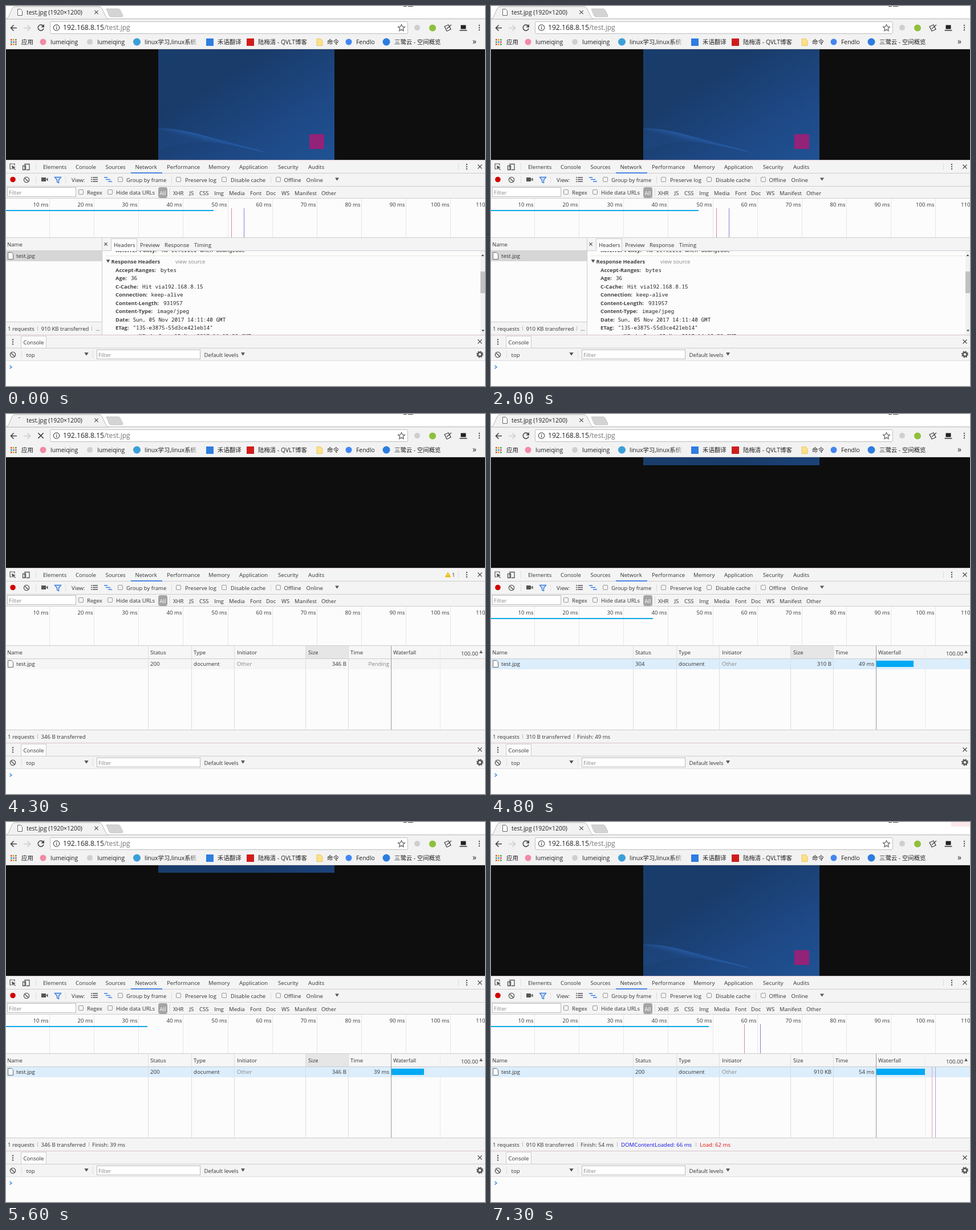
Animation of 840x667 px, one loop 7.5 s. Source, as an HTML page:

```html
<!DOCTYPE html>
<html lang="zh">
<head>
<meta charset="utf-8">
<title>Reload test</title>
<style>
html, body { margin: 0; width: 100%; height: 100%; overflow: hidden; background: #fff; }
svg { display: block; width: 840px; height: 667px; }
text { font: 9.6px 'Open Sans', 'Noto Sans', sans-serif; fill: #333; white-space: pre; }
.ui { font: 10.4px 'Open Sans', 'Noto Sans CJK SC', 'Noto Sans CJK', sans-serif; fill: #222; }
.url { font-size: 12.1px; fill: #222; }
.b { font-weight: 700; font-size: 9.4px; fill: #444; }
.m { font: 9.37px 'Noto Sans Mono', 'DejaVu Sans Mono', monospace; fill: #222; }
.g { fill: #888; }
.e { text-anchor: end; }
</style>
</head>
<body>
<svg id="stage" viewBox="0 0 840 667" xmlns="http://www.w3.org/2000/svg"></svg>
<script>
const T = (x, y, s, c = '', extra = '') => `<text x="${x}" y="${y}" class="${c}" ${extra}>${s}</text>`;
const R = (x, y, w, h, fill, extra = '') => `<rect x="${x}" y="${y}" width="${w}" height="${h}" fill="${fill}" ${extra}/>`;
const P = (d, stroke = '#555', w = 1, fill = 'none') => `<path d="${d}" stroke="${stroke}" stroke-width="${w}" fill="${fill}"/>`;
const C = (x, y, r, fill, extra = '') => `<circle cx="${x}" cy="${y}" r="${r}" fill="${fill}" ${extra}/>`;
const G = (id, body, extra = '') => `<g id="${id}" ${extra}>${body}</g>`;
const H = (y, c = '#ccc', x = 0, w = 840) => R(x, y, w, 1, c);
const V = (x, y, h, c = '#ddd') => R(x, y, 1, h, c);
const row = (y, list, c) => list.map(([x, s]) => T(x, y, s, c)).join('');
const box = (x, y, w, h) => R(x + .5, y + .5, w, h, '#fff', 'stroke="#bbb"');
const check = (x, y) => R(x + .5, y + .5, 8, 8, '#f4f4f4', 'rx="1.5" stroke="#999"');
const cross = (x, y, s, w = 1.3, c = '#555') => P(`M${x - s} ${y - s}l${2 * s} ${2 * s}m0 ${-2 * s}l${-2 * s} ${2 * s}`, c, w);
const tri = (x, y, w, h, c = '#555') => P(`M${x - w} ${y - h / 2}h${2 * w}l${-w} ${h}z`, 'none', 0, c);
const dots = (x, y, c = '#555') => [-4, 0, 4].map(d => C(x, y + d, 1.2, c)).join('');
const ban = (x, y) => C(x, y, 4.6, 'none', 'stroke="#555" stroke-width="1.4"') + P(`M${x - 3} ${y - 3}l6 6`, '#555', 1.4);
const page = (x, y, w, h) => P(`M${x} ${y}h${w - 3}l3 3v${h - 3}h${-w}z`, '#666', 1, '#fff');

const defs = `<defs>
<linearGradient id="sky" x1="0" y1="0" x2="1" y2="1">
  <stop offset="0" stop-color="#193d6c"/><stop offset=".3" stop-color="#193b69"/>
  <stop offset=".65" stop-color="#1d4782"/><stop offset="1" stop-color="#205294"/></linearGradient>
<linearGradient id="beam" gradientUnits="userSpaceOnUse" x1="108" y1="159" x2="105.6" y2="168.7">
  <stop offset="0" stop-color="#2a62b2" stop-opacity=".7"/>
  <stop offset=".45" stop-color="#2860ad" stop-opacity=".38"/>
  <stop offset="1" stop-color="#2860ad" stop-opacity=".13"/></linearGradient>
<linearGradient id="fade"><stop offset="0" stop-color="#f2f2f2" stop-opacity="0"/><stop offset="1" stop-color="#f2f2f2"/></linearGradient>
<clipPath id="fitClip"><rect id="strip" x="267" y="76" width="309" height="194"/></clipPath>
<clipPath id="zoomClip"><rect x="0" y="76" width="830" height="179"/></clipPath>
<clipPath id="paneClip"><rect x="169" y="430" width="663" height="147"/></clipPath>
<clipPath id="markClip"><rect x="240" y="52" width="98" height="22"/></clipPath>
<g id="pic">${R(0, 0, 310, 194, 'url(#sky)')}
${P('M0 138C45 139.5 78 151 108 159C125 163.5 140 167.5 157 171.6S180 178 195 183C150 174 110 162 76 162C50 162 25 169 0 177z', 'none', 0, 'url(#beam)')}
${R(265, 149, 26, 26, '#932279')}</g>
</defs>`;

const grid = () => [0, 1, 2].flatMap(i => [0, 1, 2].map(j =>
  R(8 + i * 4, 58 + j * 4, 2.6, 2.6, ['#e8453c', '#f0a020', '#3aa757', '#4285f4'][(i + j * 2) % 4]))).join('');

const chrome = [
  R(0, 0, 840, 76, '#f2f2f2'), R(0, 0, 840, 22, '#fff'),
  P('M-1 23C7 22 8 3 15 1H164C171 3 173 22 180 23z', '#b5b5b5', 1, '#f2f2f2'),
  H(22, '#b5b5b5', 180, 660),
  P('M176 5H197Q199 5 200 7L205 17Q205 19 203 19H185Q182 19 181 17z', '#c2c2c2', 1, '#d4d4d4'),
  R(697, 0, 6, 1, '#444'), R(705, 0, 9, 1, '#444'),
  T(36, 15, 'test.jpg (1920×1200)', 'ui'), cross(158.5, 11, 3.2, 1.2),
  P('M19 38.5H9M13.5 33.5l-5 5 5 5', '#444', 1.6), P('M31 38.5H42M37.5 33.5l5 5-5 5', '#ccc', 1.5),
  R(77.5, 27.5, 627, 21, '#fff', 'rx="2" stroke="#bfbfbf"'),
  C(88.5, 38, 5.2, 'none', 'stroke="#555" stroke-width="1.2"'), R(88, 37, 1.2, 4, '#555'), R(88, 35, 1.2, 1.2, '#555'),
  T(100, 42, '192.168.8.15<tspan fill="#777">/test.jpg</tspan>', 'ui url'),
  P('M693.5 32.5l1.7 3.8 4.2.4-3.1 2.8.9 4.1-3.7-2.1-3.7 2.1.9-4.1-3.1-2.8 4.2-.4z', '#555', 1.1),
  C(721, 38, 5, '#cfcfcf'), C(748, 38.5, 6, '#8fbf3c'),
  P('M769 36l7-3 4 8-7 3zM773 40l8-7', '#444', 1.3),
  R(797.5, 33.5, 9, 7, '#222'), R(795.5, 42, 13, 1.6, '#444'), dots(830, 38),
  grid(),
  C(65, 63, 5.5, '#f28aa5'), C(147, 63, 5, '#cfcfcf'), C(229.5, 63, 6.5, '#3a9fd8'),
  R(351, 57, 13, 13, '#2f7de1'), R(422, 57, 13, 13, '#cf1c1c'),
  P('M545 57.5h7l3 3v9h-10z', '#e8c862', 1, '#fbe08a'),
  C(601, 63, 5.5, '#4285f4'), C(667, 63, 6.5, '#2b7de0'),
  row(67, [[27, '应用'], [78, 'lumeiqing'], [160, 'lumeiqing'], [371, '禾语翻译'],
    [442, '陆梅清 - QVLT博客'], [563, '命令'], [614, 'Fendlo'], [681, '三鹭云 - 空间概览']], 'ui'),
  `<g clip-path="url(#markClip)">${T(243, 67, 'linux学习,linux系统', 'ui')}${R(322, 53, 16, 20, 'url(#fade)')}</g>`,
  T(818, 67, '»', 'ui', 'style="font-size:14px"'), H(75, '#d0d0d0'),
  G('file', page(20.5, 5.5, 8, 11)), G('spin', R(22, 6, 3, 1, '#777')),
  G('reload', P('M65.5 35.5A5 5 0 1 0 66 39.5', '#444', 1.6) + P('M67 32v5.5h-5.5z', 'none', 0, '#444')),
  G('stop', cross(61, 38, 4.6, 1.5, '#444')),
].join('');

const view = [
  R(0, 76, 840, 194, '#0e0e0e'),
  G('fit', '<use href="#pic" x="267" y="76"/>', 'clip-path="url(#fitClip)"'),
  G('zoom', [
    R(0, 76, 840, 194, '#f1f1f1'),
    '<g clip-path="url(#zoomClip)"><use id="big" href="#pic"/></g>',
    R(13, 257, 409, 11, '#a8a8a8'), '<rect id="thumb" x="832" y="214" width="8" height="27" fill="#c1c1c1"/>',
    P('M7 260v5l-3-2.5zM822 260v5l3-2.5zM833.5 85h5l-2.5-3z', 'none', 0, '#555'), tri(836, 248, 2.5, 3, '#999'),
  ].join('')),
].join('');

const ticks = Array.from({ length: 11 }, (_, i) => {
  const x = Math.round(76 + 78.15 * i);
  return V(x, 338, 68, '#e6e6e6') + T(x - 1.5, 352, `${10 * (i + 1)} ms`, 'e');
}).join('');

const tools = [
  R(0, 270, 840, 397, '#fcfcfc'), R(0, 270, 840, 67, '#f4f4f4'), H(270, '#d8c4cc'),
  P('M11 277H7v9h3M11 277h4v3', '#555', 1.2), P('M10 280l7 3-3 1 3 3-1 1-3-3-2 2z', 'none', 0, '#555'),
  P('M33 286.5v-9h8v10h-5M29.5 280.5h5v7h-5z', '#555', 1.3), V(52, 276, 12),
  row(286, [[65, 'Elements'], [122, 'Console'], [174.5, 'Sources'], [226.5, 'Network'], [282, 'Performance'],
    [355, 'Memory'], [409, 'Application'], [477, 'Security'], [530, 'Audits']]),
  V(793, 276, 12), dots(808, 282), cross(831, 282, 3.5, 1.4),
  H(293), R(219, 292, 55, 2, '#4a86e0'), C(12, 304.5, 4.8, '#d50000'), ban(36, 305), V(52, 299, 12), V(104, 299, 12),
  R(62, 301, 8, 7, '#555'), P('M70 304.5l3.5-3v6z', 'none', 0, '#555'),
  P('M85.5 300.5h11l-4 5v5l-3-1.5v-3.5z', '#3b7de0', 1.3, '#cfe0fb'),
  P('M149 301h2m1 0h9M149 304.5h2m1 0h9M149 308h2m1 0h9', '#555', 1.7),
  P('M172 301h6M175 304.5h8M179 308h7', '#3b7de0', 1.7),
  [[196, 300], [298, 300], [378, 300], [473, 300], [127, 322], [178, 322]].map(a => check(...a)).join(''),
  V(290, 299, 12), V(464, 299, 12),
  row(309, [[115, 'View:'], [211, 'Group by frame'], [314, 'Preserve log'], [394, 'Disable cache'], [487.5, 'Offline'], [526.5, 'Online']]),
  tri(580.5, 304, 3.5, 5), H(316),
  box(2, 318, 120, 16), T(5, 331, 'Filter', 'g'),
  R(267, 318, 16, 19, '#a5a5a5', 'rx="4"'), T(269.5, 332, 'All', '', 'style="fill:#fff"'),
  row(331, [[142, 'Regex'], [193, 'Hide data URLs']]),
  row(332, [[293, 'XHR'], [321.5, 'JS'], [339, 'CSS'], [365, 'Img'], [391, 'Media'],
    [428, 'Font'], [456, 'Doc'], [483, 'WS'], [506, 'Manifest'], [553, 'Other']]),
  V(287, 320, 14), H(337), ticks,
  '<rect id="bar" x="0" y="358" height="2" fill="#0fa5ea"/>',
  '<rect id="red" y="355" width="1" height="51" fill="#d88a94"/><rect id="blue" y="355" width="1" height="51" fill="#7f7fd8"/>',
  H(406), H(554), R(0, 555, 840, 22, '#f4f4f4'),
  G('warn', P('M775 278l4.5 8h-9z', '#e8b400', 1, '#f4bd00') + R(774.5, 280.5, 1, 3, '#fff') + T(782, 286, '1')),
].join('');

const fields = [['Accept-Ranges', 271, 'bytes'], ['Age', 219, '36'], ['C-Cache', 239, 'Hit via192.168.8.15'],
  ['Connection', 254.5, 'keep-alive'], ['Content-Length', 276, '931957'], ['Content-Type', 265, 'image/jpeg'],
  ['Date', 222.5, 'Sun, 05 Nov 2017 14:11:40 GMT'], ['ETag', 222.5, '"135-e3875-55d3ce421eb14"'],
  ['Last-Modified', 267, 'Sun, 05 Nov 2017 14:03:58 GMT']];
const field = ([k, x, v], y) => T(192, y, k + ':', 'b') + T(x, y, v, 'm');

const detail = G('detail', [
  R(0, 407, 168, 22, '#f4f4f4'), H(429, '#ccc', 0, 168), T(2, 422, 'Name'),
  R(0, 430, 168, 18, '#d6d6d6'), page(3.5, 432.5, 9, 12), T(18, 442, 'test.jpg'),
  V(168, 407, 170, '#ccc'), R(169, 407, 671, 22, '#f4f4f4'), H(429, '#ccc', 169, 671),
  cross(175, 418, 2.6), R(184.5, 408.5, 45, 22, '#fcfcfc', 'stroke="#ccc"'),
  row(423, [[189, 'Headers'], [235, 'Preview'], [278, 'Response'], [330, 'Timing']]),
  '<g clip-path="url(#paneClip)">', R(169, 430, 663, 147, '#fcfcfc'),
  field(['Referrer-Policy', 273, 'no-referrer-when-downgrade'], 432), H(438, '#ece6d8', 175, 657),
  tri(179, 448, 3.3, 5.5), T(184.5, 452, 'Response Headers', 'b'), T(297, 452, 'view source', 'g'),
  fields.map((f, i) => field(f, Math.round(467 + 14.45 * i))).join(''), '</g>',
  R(832, 430, 8, 147, '#f1f1f1'), R(832, 466, 8, 38, '#c1c1c1'),
  P('M833.5 439h5l-2.5-3z', 'none', 0, '#444'), tri(836.5, 570, 2.5, 3, '#444'),
  T(3, 570, '1 requests'), V(55, 562, 8, '#bbb'), T(61.5, 570, '910 KB transferred'), V(150, 562, 8, '#bbb'), T(157, 570, '...'),
].join(''));

const table = G('table', [
  R(0, 407, 840, 22, '#f6f6f6'), '<rect id="sizeHead" x="526" y="407" width="75" height="22" fill="#e6e6e6"/>', H(429),
  '<rect id="rowBg" x="0" y="430" width="840" height="18"/>',
  [249, 325, 400, 525, 600].map(x => V(x, 407, 147)).join(''), V(761, 407, 147, '#ebebeb'), V(675, 407, 147, '#999'),
  row(422, [[2, 'Name'], [253, 'Status'], [329, 'Type'], [405, 'Initiator'], [530, 'Size'], [604, 'Time'], [679, 'Waterfall']]),
  T(828, 424, '100.00', 'e'), P('M830 420h6l-3-5.5z', 'none', 0, '#666'),
  G('entry', [
    page(3.5, 432.5, 9, 12), row(442, [[18, 'test.jpg'], [329, 'document']]), T(405, 442, 'Other', 'g'),
    T(253, 442, '', '', 'id="status"'), T(597, 442, '', 'e', 'id="size"'), T(672, 442, '', 'e', 'id="time"'),
    '<rect id="fall" x="676" y="433" height="11" fill="#03a9f4"/>',
    G('marks', V(773, 430, 124, '#eba0a0') + V(779, 430, 124, '#a5a5e6')),
    T(3, 570, '1 requests'), V(55, 562, 8, '#bbb'), T(61.5, 570, '', '', 'id="sent"'),
    G('finish', R(-6, 562, 1, 8, '#bbb') + T(0, 570, '', '', 'id="finishText"')),
    G('loaded', V(221, 562, 8, '#bbb') + T(228, 570, 'DOMContentLoaded: 66 ms', '', 'style="fill:#1010e0"') +
      V(359, 562, 8, '#bbb') + T(366, 570, 'Load: 62 ms', '', 'style="fill:#e01010"')),
  ].join('')),
  G('empty', T(420, 483, 'Recording network activity…', 'g', 'text-anchor="middle"') +
    T(430, 508, 'Perform a request or hit F5 to record the reload.', 'g', 'text-anchor="middle"')),
].join(''));

const drawer = [
  H(577, '#d8c4cc'), R(0, 578, 840, 45, '#f4f4f4'), dots(12, 589.5), R(26.5, 579.5, 44, 21, '#fcfcfc', 'stroke="#ccc"'),
  T(30.5, 594, 'Console'), cross(831, 589, 3.5, 1.4), H(600, '#ccc'), ban(12, 612), V(27, 605, 13),
  T(35.5, 616, 'top'), tri(141, 611, 3.7, 5.5), V(152, 605, 13), box(159, 603, 181, 16), T(162, 616, 'Filter', 'g'),
  T(347.5, 616, 'Default levels'), tri(415.5, 611, 3.5, 5.5),
  C(831, 611.5, 3.5, 'none', 'stroke="#555" stroke-width="2.6"'),
  C(831, 611.5, 5.3, 'none', 'stroke="#555" stroke-width="1.6" stroke-dasharray="2.1 2.06"'),
  H(622, '#ddd'), R(0, 623, 840, 44, '#fcfcfc'), P('M6.5 631l3.5 2.7-3.5 2.7', '#3b82f0', 1.4),
  G('close', R(807, 0, 33, 8, '#fce8ea')),
].join('');

document.getElementById('stage').innerHTML = defs + chrome + view + tools + detail + table + drawer;

const $ = Object.fromEntries([...document.querySelectorAll('[id]')].map(e => [e.id, e]));
const show = (id, on) => { $[id].style.display = on ? '' : 'none'; };
const set = (id, key, v) => $[id].setAttribute(key, v);

// One finished request: status, size, time, then bar lengths and visible picture height.
const done = (status, size, ms, bar, fall, h, more) => ({ row: [status, size, ms + ' ms'], ms, bar, fall, h, hover: 1, ...more });
const first = { h: 194, detail: 1, bar: 364, red: 395, blue: 417 };
const busy = { ...first, busy: 1 };
const wait = { busy: 1, h: 0, row: ['200', '346 B', 'Pending'] };
const warned = { ...wait, warn: 1, spin: 1 };
const clear = { busy: 1, h: 0 };
const short304 = done('304', '310 B', 49, 284, 65, 14);
const short200 = done('200', '346 B', 39, 248, 57, 13);
const full = done('200', '910 KB', 54, 382, 85, 194, { red: 444, blue: 472, marks: 1, calm: 1 });

const steps = [
  [0, first], [1200, { ...first, zoom: 1 }], [2000, first], [3500, busy], [3600, wait], [3900, { ...wait, spin: 1 }],
  [4000, wait], [4100, { ...wait, warn: 1 }], [4300, warned], [4400, clear], [4500, wait], [4600, short304], [4700, clear],
  [4800, short304], [4900, clear], [5000, wait], [5100, short200], [5200, clear], [5300, wait], [5400, short304],
  [5500, clear], [5600, short200], [5700, clear], [5800, wait], [5900, short200], [6000, clear], [6100, wait],
  [6200, { ...full, h: 14, red: 0, blue: 0, marks: 0, calm: 0 }], [6300, full],
];

function apply(s) {
  show('fit', s.h && !s.zoom); set('strip', 'height', s.h);
  show('zoom', s.zoom);
  show('file', !s.busy); show('reload', !s.busy); show('stop', s.busy); show('spin', s.spin);
  show('warn', s.warn);
  show('detail', s.detail); show('table', !s.detail); show('entry', s.row); show('empty', !s.row);
  set('bar', 'width', s.bar || 0);
  for (const id of ['red', 'blue']) { show(id, s[id]); set(id, 'x', s[id] || 0); }
  set('rowBg', 'fill', s.hover ? '#dcedfb' : '#f5f5f5');
  set('sizeHead', 'fill', s.calm ? '#f6f6f6' : '#e6e6e6');
  set('fall', 'width', s.fall || 0);
  show('marks', s.marks); show('loaded', s.marks); show('finish', s.ms);
  if (!s.row) return;
  ['status', 'size', 'time'].forEach((id, i) => { $[id].textContent = s.row[i]; });
  $.time.classList.toggle('g', !s.ms);
  $.sent.textContent = s.row[1] + ' transferred';
  $.finishText.textContent = `Finish: ${s.ms} ms`;
  set('finish', 'transform', `translate(${s.marks ? 157 : 151} 0)`);
}

function scroll(t) {
  const p = Math.min(7, Math.max(0, Math.floor((t - 1200) / 100))) / 7;
  const y = 840 - 300 * p * p * (3 - 2 * p);
  set('big', 'transform', `translate(0 ${76 - y}) scale(5.28)`);
  set('thumb', 'y', 89 + 125 * y / 840);
}

let current;
const start = performance.now();
function frame() {
  const t = Math.max(0, performance.now() - start) % 7500;
  const s = steps.findLast(([at]) => at <= t)[1];
  if (s !== current) apply(current = s);
  if (s.zoom) scroll(t);
  $.close.style.opacity = t < 7100 ? 0 : Math.min(1, (Math.floor((t - 7100) / 100) + 1) / 3);
  requestAnimationFrame(frame);
}
frame();
</script>
</body>
</html>
```
